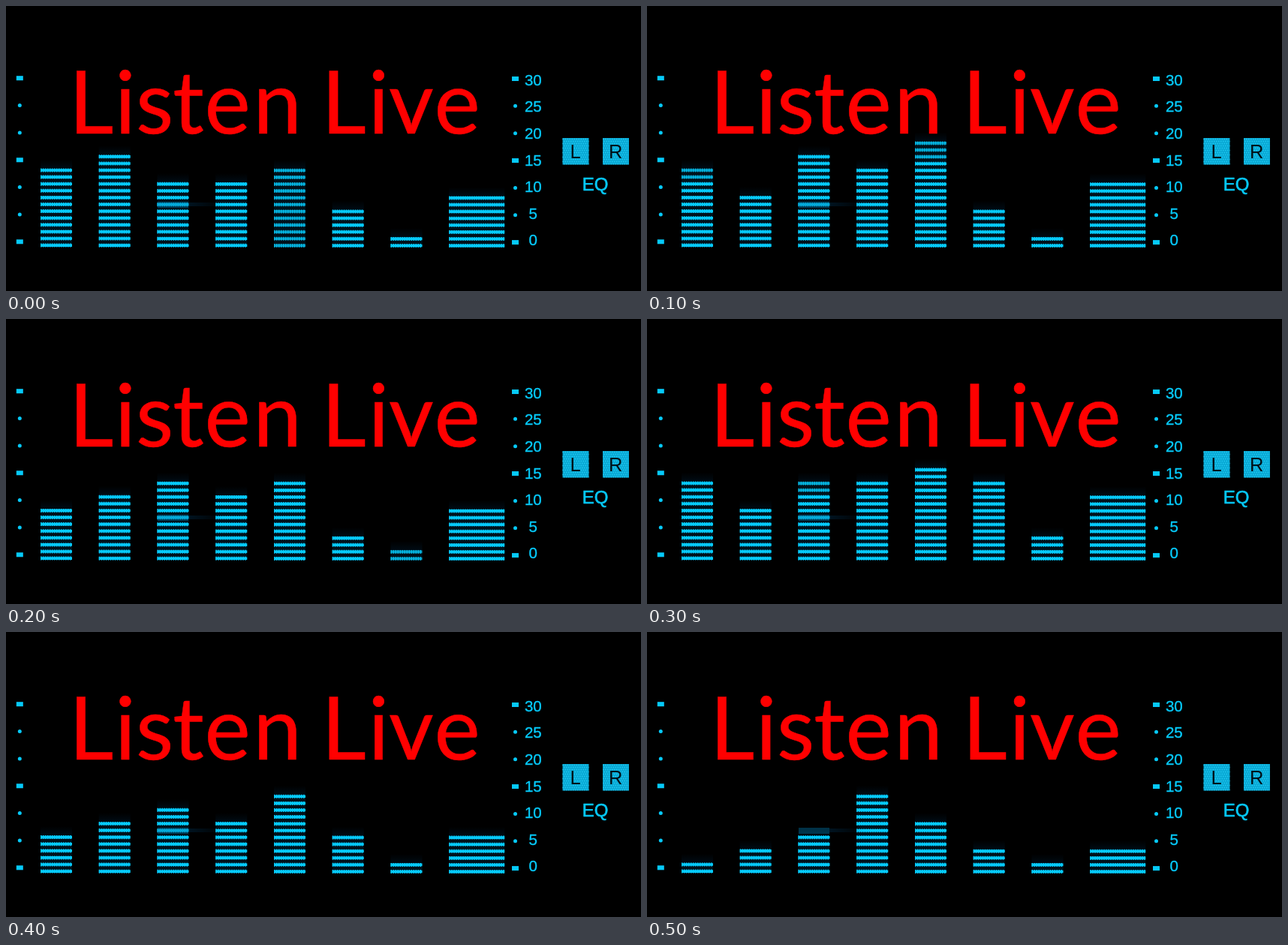
Write an HTML page with a canvas that moves like this. It is 846 by 380 pixels and loops after 600 ms.

```html
<!DOCTYPE html>
<html lang="en">
<head>
<meta charset="utf-8">
<title>Listen Live</title>
<style>
html, body { margin: 0; height: 100%; overflow: hidden; background: #000; }
canvas { display: block; }
</style>
</head>
<body>
<canvas id="stage" width="846" height="380"></canvas>
<script>
const ctx = document.getElementById('stage').getContext('2d');
const CYAN = '#06cafa';
const SANS = '"Liberation Sans", Arial, sans-serif';
const STEP = 100;

// Lit rows of each bar, one line per step
const levels = [
  [12, 14, 10, 10, 12, 6, 2, 8],
  [12, 8, 14, 12, 16, 6, 2, 10],
  [8, 10, 12, 10, 12, 4, 2, 8],
  [12, 8, 12, 12, 14, 12, 4, 10],
  [6, 8, 10, 8, 12, 6, 2, 6],
  [2, 4, 6, 12, 8, 4, 2, 4]
];
// Dimmed top rows, keyed by step and bar
const dim = { '0,4': 12, '1,0': 2, '1,4': 3, '2,6': 2, '3,2': 2 };

function line(x, y, w, width, color, dash = []) {
  ctx.strokeStyle = color;
  ctx.lineWidth = width;
  ctx.setLineDash(dash);
  ctx.beginPath();
  ctx.moveTo(x, y);
  ctx.lineTo(x + w, y);
  ctx.stroke();
}

function text(s, x, y, font, color, weight = 0) {
  ctx.font = font;
  ctx.fillStyle = ctx.strokeStyle = color;
  ctx.fillText(s, x, y);
  if (!weight) return;
  ctx.setLineDash([]);
  ctx.lineWidth = weight;
  ctx.strokeText(s, x, y);
}

function marks(x, y) {
  ctx.fillStyle = CYAN;
  for (let i = 0; i < 7; i++) {
    const cy = y + 36.35 * i;
    ctx.beginPath();
    if (i % 3) ctx.arc(x, cy, 2.5, 0, 7);
    else ctx.rect(x - 4.5, cy - 3, 9, 6);
    ctx.fill();
  }
}

function button(letter, x) {
  ctx.fillStyle = '#08a8d4';
  ctx.fillRect(x, 176, 35, 35.5);
  for (let r = 0; r < 12; r++)
    line(x + r % 2 * 1.5, 177.5 + r * 3, 33.5, 1.5, '#20c8f0', [1.5, 1.5]);
  text(letter, x + 17.2, 202.5, '25.5px ' + SANS, '#001018');
}

function bar(step, i) {
  const x = 46 + 77.75 * i, w = i === 7 ? 74 : 42, n = levels[step][i];
  const bottom = 319.1 + i * .07;   // the panel leans slightly
  const rowY = r => bottom - 9.1 * r;
  const top = rowY(n - 1) - 2.5;

  const glow = ctx.createLinearGradient(0, top - 12, 0, top);
  glow.addColorStop(0, 'rgba(0,50,90,0)');
  glow.addColorStop(1, 'rgba(0,50,90,.22)');
  ctx.fillStyle = glow;
  ctx.fillRect(x, top - 12, w, 12);
  ctx.fillStyle = '#00121c';
  ctx.fillRect(x, top, w, bottom + 2.5 - top);

  for (let r = 0; r < n; r++) {
    ctx.globalAlpha = r >= n - (dim[[step, i]] || 0) ? .72 : 1;
    line(x, rowY(r), w, 5, CYAN, [1.5, 1.5]);
    line(x, rowY(r), w, 3.6, CYAN);
  }
  ctx.globalAlpha = 1;
}

function smudge() {
  ctx.fillStyle = 'rgba(0,120,170,.4)';
  ctx.fillRect(202, 261, 41, 8);
  const fade = ctx.createLinearGradient(240, 0, 290, 0);
  fade.addColorStop(0, 'rgba(0,60,100,.35)');
  fade.addColorStop(1, 'rgba(0,60,100,0)');
  ctx.fillStyle = fade;
  ctx.fillRect(243, 262, 47, 5);
}

function title() {
  const centers = [113.5, 159, 198, 243, 295, 361.5, 0, 450, 496.5, 540, 601];
  [...'Listen Live'].forEach((c, i) =>
    text(c, centers[i], 169.5, '116px Lato, "Open Sans", sans-serif', '#f00', .5));
}

function draw(time) {
  const step = Math.floor(time / STEP) % levels.length;
  ctx.fillStyle = '#000';
  ctx.fillRect(0, 0, 846, 380);
  ctx.textAlign = 'center';

  levels[step].forEach((_, i) => bar(step, i));
  smudge();

  marks(18.3, 96.2);
  marks(678.5, 97);
  for (let i = 0; i < 7; i++)
    text(30 - 5 * i, 702.3, 105.8 + 35.6 * i, '20.5px ' + SANS, CYAN, .4);
  button('L', 741.5);
  button('R', 795);
  text('EQ', 785, 246, '24px ' + SANS, CYAN, .6);
  title();
}

let start;
function tick(now) {
  start ??= now;
  draw(now - start);
  requestAnimationFrame(tick);
}
requestAnimationFrame(tick);
</script>
</body>
</html>
```
